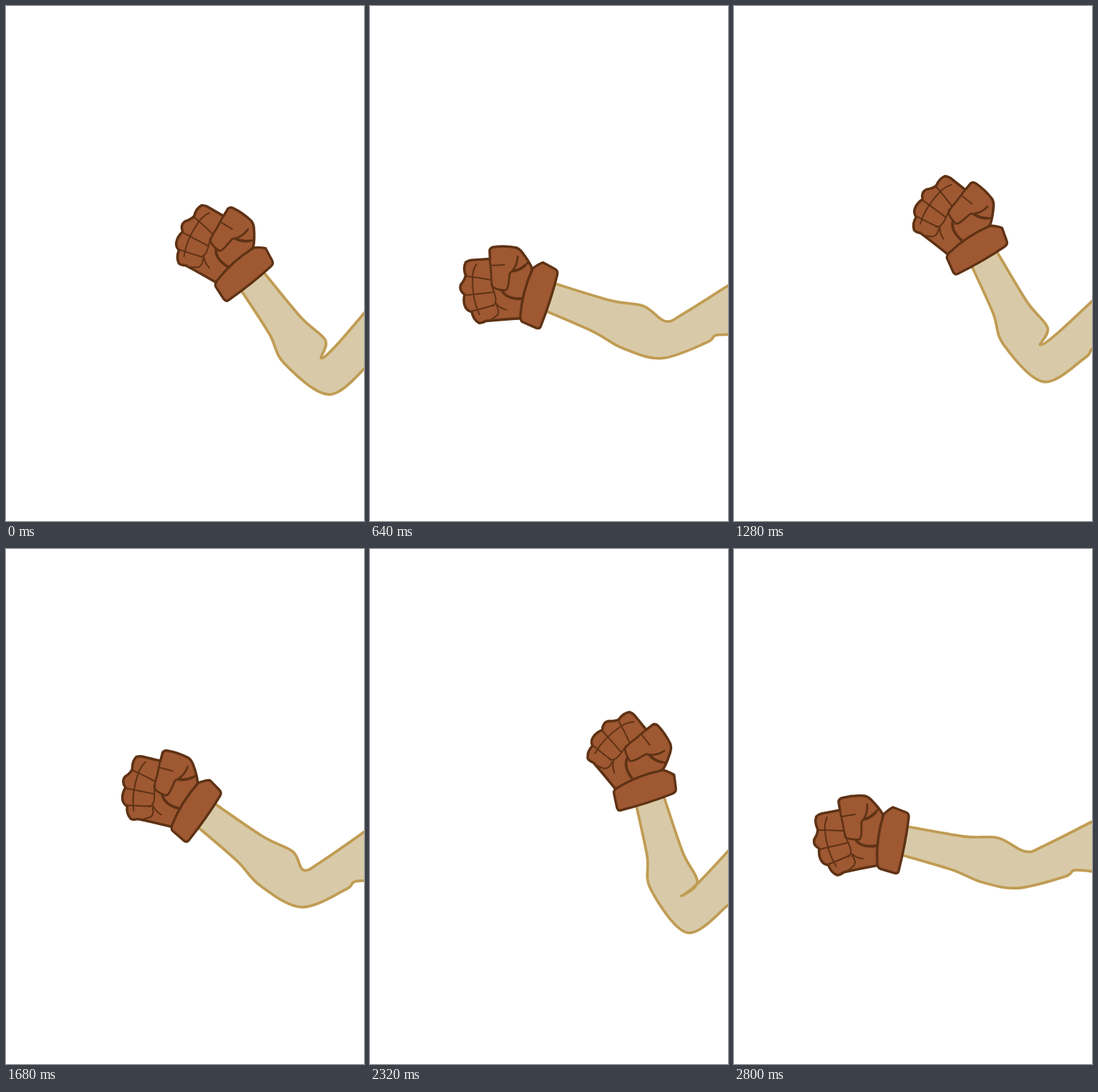
Write an HTML page with a canvas that moves like this. It is 500 px wide and 720 px high and loops after 2.88 s.

```html
<!DOCTYPE html>
<html lang="en">
<head>
<meta charset="utf-8">
<title>Punching arm</title>
<style>
html, body { margin: 0; width: 100%; height: 100%; overflow: hidden; background: #fff; }
canvas { display: block; }
</style>
</head>
<body>
<canvas id="stage" width="500" height="720"></canvas>
<script>
const ctx = document.getElementById('stage').getContext('2d');
const LOOP = 2880, STEP = 80, PUNCH = 960;
const SKIN = '#d8caa8', SKIN_LINE = '#c09c54', GLOVE = '#9e5832', GLOVE_LINE = '#5e3214';

// The stretched arm, with the joints it turns about.
const SHOULDER = [596, 375], ELBOW = [397, 446];
const foreTop = [[236, 387], [322, 402], [369, 404]];
const upperTop = [[407, 423], [435, 414], [510, 376]];
const upperBottom = [[510, 452], [476, 449], [462, 458], [397, 474]];
const foreBottom = [[347, 466], [303, 448], [228, 426]];

const hand = new Path2D('M148 365L146 353Q147 349 151 348Q166 344 182 345Q187 346 191 350Q202 361 208 371L203 442Q175 447 153 452Q148 456 144 456Q135 452 132 442Q124 441 121 434Q118 428 119 419Q110 414 112 406Q117 398 117 392Q112 382 115 374Q118 371 122 370Z');
const cuff = new Path2D('M209 371Q216 364 222 361L240 368Q245 370 244 376Q240 410 230 450Q229 454 224 453L204 447Q201 446 200 440Q198 405 209 371Z');
const fingers = new Path2D('M130 375Q126 384 127 394Q130 424 143 444M117 393Q135 393 152 394M119 420Q140 415 158 411M131 441Q150 434 162 428M154 400Q161 412 163 420Q164 428 160 430M163 425Q170 432 180 433M165 429Q171 436 168 442Q163 447 160 449M151 374L169 371');
const thumb = new Path2D('M148 366Q150 376 152 384Q154 400 157 404Q165 407 175 406Q178 404 178 396V382Q180 377 186 376Q195 373 201 364M186 357Q187 368 182 376');
const folds = new Path2D('M182 378Q191 376 198 368M170 407Q178 418 198 415');

// Elbow bend in degrees: a slow first punch, then two quick ones.
function bendAt(time) {
  if (time < PUNCH) return Math.max(0, 40.7 - 0.0525 * time);
  const phase = time % PUNCH;
  if (phase < 400) return 61.5 * phase / 400;
  return 61.5 * (1 - Math.min(1, (phase - 400) / 480) ** 1.25);
}

const turnAbout = (bone, [x, y], angle) => bone.translate(x, y).rotate(angle).translate(-x, -y);

const place = (bone, points) => points.map(([x, y]) => {
  const p = bone.transformPoint({ x, y });
  return [p.x, p.y];
});

// Smooth curve through points.
function curve(path, pts) {
  const at = i => pts[Math.max(0, Math.min(pts.length - 1, i))];
  path.lineTo(...pts[0]);
  for (let i = 0; i < pts.length - 1; i++) {
    const [a, b, c, d] = [at(i - 1), at(i), at(i + 1), at(i + 2)];
    path.bezierCurveTo(
      b[0] + (c[0] - a[0]) / 6, b[1] + (c[1] - a[1]) / 6,
      c[0] - (d[0] - b[0]) / 6, c[1] - (d[1] - b[1]) / 6, ...c);
  }
}

function paint(path, width, line, fill) {
  if (fill) {
    ctx.fillStyle = fill;
    ctx.fill(path);
  }
  ctx.strokeStyle = line;
  ctx.lineWidth = width;
  ctx.stroke(path);
}

function drawArm(upperBone, foreBone) {
  const arm = new Path2D();
  curve(arm, [...place(foreBone, foreTop), ...place(upperBone, upperTop)]);
  curve(arm, [...place(upperBone, upperBottom), ...place(foreBone, foreBottom)]);
  arm.closePath();
  paint(arm, 3.8, SKIN_LINE, SKIN);
}

function drawFist() {
  paint(hand, 3.6, GLOVE_LINE, GLOVE);
  paint(fingers, 2, GLOVE_LINE);
  paint(thumb, 2.8, GLOVE_LINE);
  paint(folds, 3.8, GLOVE_LINE);
  paint(cuff, 3.4, GLOVE_LINE, GLOVE);
}

function frame(now) {
  const time = Math.floor(now % LOOP / STEP) * STEP;
  const bend = bendAt(time);
  // The elbow drops as it bends, and starts out lower still.
  const drop = 0.327 * bend + 9.4 * Math.max(0, 1 - time / PUNCH);
  const upperBone = turnAbout(new DOMMatrix(), SHOULDER, -drop);
  const foreBone = turnAbout(upperBone, ELBOW, bend + drop);

  ctx.resetTransform();
  ctx.clearRect(0, 0, 500, 720);
  ctx.lineJoin = ctx.lineCap = 'round';
  drawArm(upperBone, foreBone);
  ctx.setTransform(foreBone);
  drawFist();
  requestAnimationFrame(frame);
}
requestAnimationFrame(frame);
</script>
</body>
</html>
```
